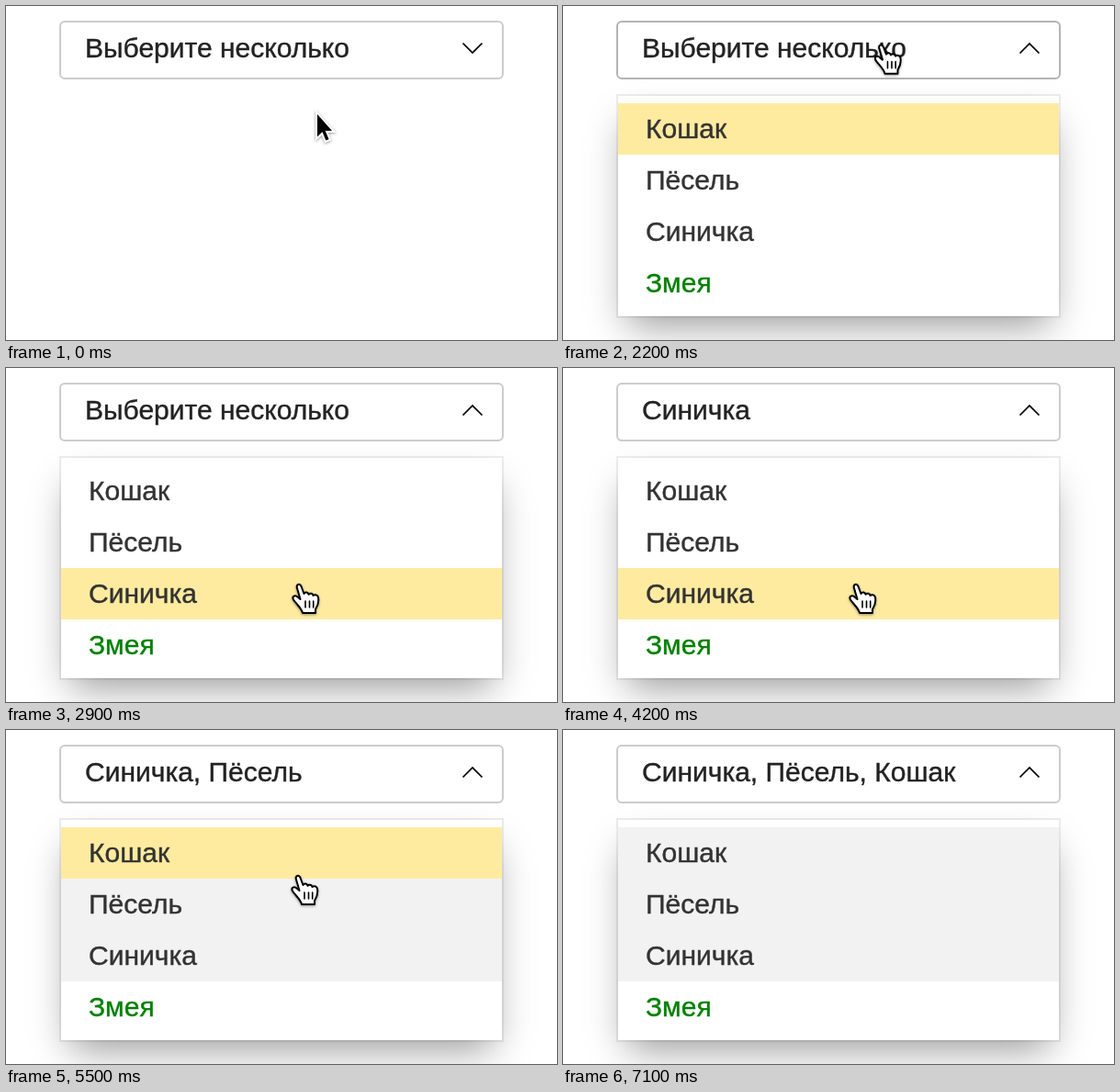
An HTML page that plays this animation: 600x364 px, repeating every 7200 ms.

```html
<!DOCTYPE html>
<html lang="ru">
<head>
<meta charset="utf-8">
<style>
  html, body { margin: 0; width: 100%; height: 100%; overflow: hidden; background: #fff; }
  body { position: relative; font: 30px "Liberation Sans", Arial, sans-serif; -webkit-text-stroke: .4px; }
  .field, .popup, svg { position: absolute; }
  .field {
    left: 58px; top: 16px; width: 484px; height: 64px; box-sizing: border-box;
    padding-left: 26px; border: 2px solid #ccc; border-radius: 6px;
    line-height: 56px; color: #222; white-space: nowrap;
  }
  .field.hover { border-color: #b3b3b3; }
  .popup {
    left: 60px; top: 98px; width: 480px; padding: 8px 0; background: #fff;
    box-shadow: 0 0 0 2px rgba(0,0,0,.07), 0 20px 40px -10px rgba(0,0,0,.4);
  }
  .row { height: 56px; line-height: 56px; padding-left: 30px; color: #333; }
  .row:last-child { color: #008000; }
  .row.selected { background: #f2f2f2; }
  .row.active { background: #ffeba0; }
  svg { left: 0; top: 0; }
  #cursor { filter: drop-shadow(0 1px 1.5px rgba(0,0,0,.4)); }
</style>
</head>
<body>
<div class="field"></div>
<div class="popup">
  <div class="row">Кошак</div>
  <div class="row">Пёсель</div>
  <div class="row">Синичка</div>
  <div class="row">Змея</div>
</div>
<svg width="600" height="364">
  <path id="chevron" d="M-10.5 -5.5L0 5L10.5 -5.5" fill="none" stroke="#000" stroke-width="1.7"/>
  <g id="cursor">
    <path id="arrow" d="M1 4V28.5L6.5 23.3L10.3 32.6L13.6 31.2L9.7 22H17Z"
      stroke="#fff" stroke-width="4" paint-order="stroke"/>
    <g id="hand" stroke="#000" stroke-width="2" stroke-linecap="round" stroke-linejoin="round">
      <path fill="#fff" d="M6 5C4.5 .5 9 -.5 10.5 3L13.5 11C15 8.7 18 9.2 18.5 11.8
        C20 10 23 10.5 23.5 13C25.5 11.5 28.5 12.2 29 15C30 21 28 25 26 28V32H12
        C11 27 5 22 2 17.5C0 13.5 4 12 6.5 14.5L9.5 17Z"/>
      <path fill="none" stroke-width="1.6" d="M15 19V26M19.5 19V26M23.7 19V26"/>
    </g>
  </g>
</svg>
<script>
const LOOP = 7200, STEP = 100;
const ROW_TOP = 106, ROW_HEIGHT = 56;
const $ = selector => document.querySelector(selector);
const rows = [...document.querySelectorAll('.row')];

const home = { x: 338, y: 114 };
const glides = [
  { start: 0, end: 200, x: 339, y: 38 },
  { start: 2100, end: 2700, x: 311, y: 235 },
  { start: 4200, end: 4500, x: 310, y: 190 },
  { start: 5300, end: 5700, x: 310, y: 126 },
  { start: 6700, end: 7100, x: 300, y: 370 }
];
const picks = [
  { time: 3200, row: 2 },
  { time: 4800, row: 1 },
  { time: 6000, row: 0 }
];

const progress = (t, start, end) => Math.min(1, Math.max(0, (t - start) / (end - start)));
const easeInOut = p => p < .5 ? 4 * p ** 3 : 1 - 4 * (1 - p) ** 3;
const mix = (a, b, p) => a + (b - a) * p;

function cursorAt(t) {
  return glides.reduce((from, to) => {
    const p = easeInOut(progress(t, to.start, to.end));
    return { x: mix(from.x, to.x, p), y: mix(from.y, to.y, p) };
  }, home);
}

function render(now) {
  // The picture advances in whole steps.
  const t = Math.floor(now % LOOP / STEP) * STEP;
  const { x, y } = cursorAt(t);
  const tipY = y + 1;
  const opened = progress(t, 400, 540);
  const chosen = picks.filter(pick => pick.time <= t).map(pick => pick.row);
  const active = Math.max(0, Math.floor((tipY - ROW_TOP) / ROW_HEIGHT));

  const onField = tipY < 80;
  const field = $('.field');
  field.textContent = chosen.map(i => rows[i].textContent).join(', ') || 'Выберите несколько';
  field.classList.toggle('hover', onField);

  const popup = $('.popup');
  popup.style.opacity = opened;
  popup.style.transform = `translateY(${20 * (1 - opened)}px)`;
  rows.forEach((row, i) => {
    row.classList.toggle('selected', chosen.includes(i));
    row.classList.toggle('active', i === active);
  });

  $('#chevron').setAttribute('transform', `translate(508 46) rotate(${180 * Math.sqrt(opened)})`);
  $('#cursor').setAttribute('transform', `translate(${x} ${y})`);
  const pointing = onField || opened > 0;
  $('#hand').style.display = pointing ? '' : 'none';
  $('#arrow').style.display = pointing ? 'none' : '';
}

function tick() {
  render(performance.now());
  requestAnimationFrame(tick);
}
tick();
</script>
</body>
</html>
```
